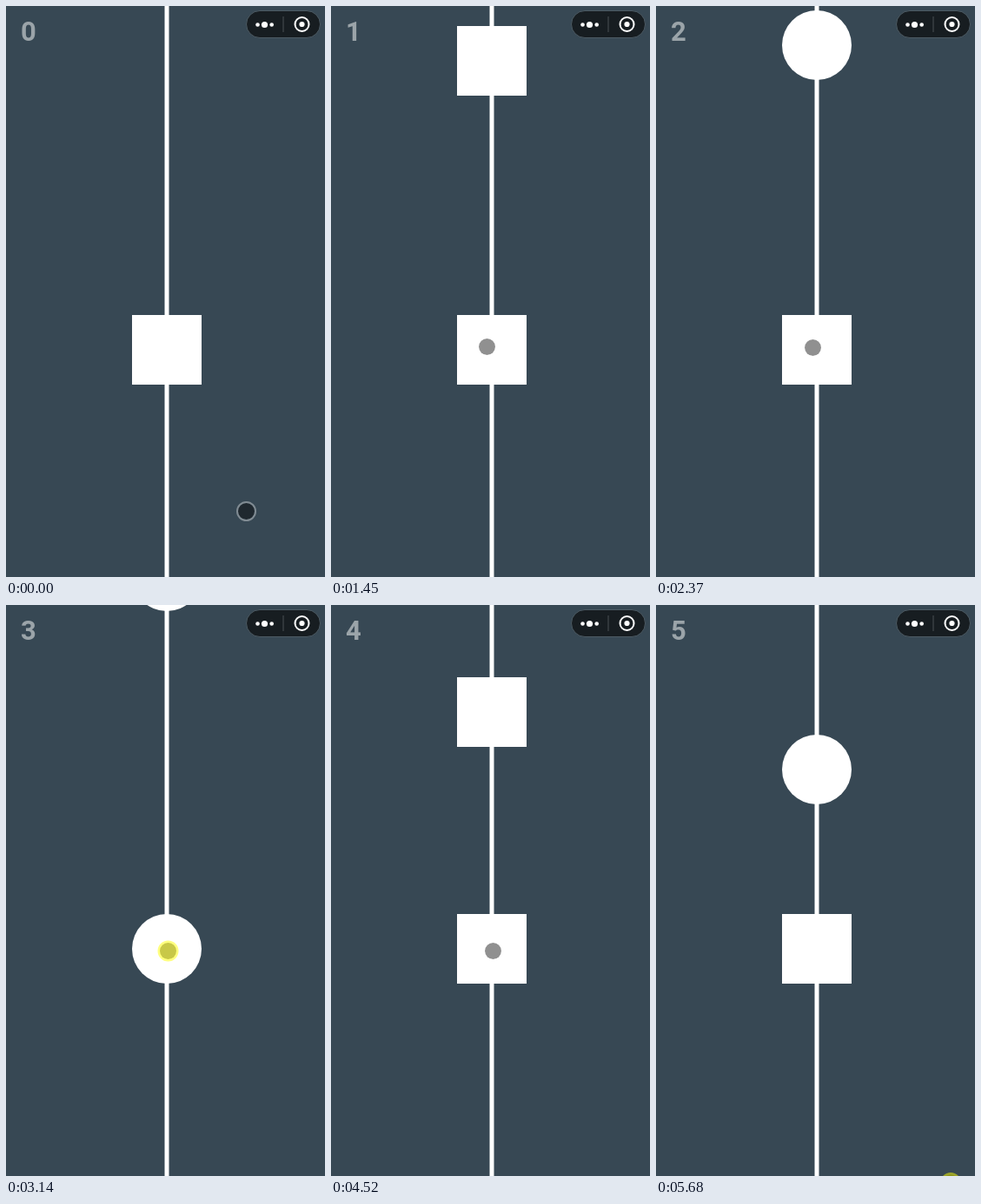
Write an HTML page that moves like this. It is 367 by 656 pixels and loops after 5750 ms.

```html
<!DOCTYPE html>
<html lang="en">
<head>
<meta charset="utf-8">
<title>Falling shapes</title>
<style>
  html, body { margin: 0; width: 100%; height: 100%; overflow: hidden; background: #374854; }
  svg { display: block; width: 367px; height: 656px; }
  text { font: bold 31px Roboto, sans-serif; fill: #9ba4a9; }
</style>
</head>
<body>
<svg viewBox="0 0 367 656">
  <rect width="367" height="656" fill="#374854"/>
  <rect x="182.5" width="5" height="656" fill="#fff"/>
  <rect id="faller" x="145" width="80" height="80" fill="#fff"/>
  <rect id="player" x="145" y="355" width="80" height="80" fill="#fff"/>
  <text id="score" x="17" y="40">0</text>
  <g>
    <rect x="276.5" y="5.5" width="85" height="31" rx="15.5" fill="#171d21" stroke="#4d5b64"/>
    <g fill="#fff">
      <circle cx="289.5" cy="21.5" r="2.3"/>
      <circle cx="297.5" cy="21.5" r="3.6"/>
      <circle cx="305.7" cy="21.5" r="2.3"/>
      <circle cx="340.5" cy="21" r="3.1"/>
    </g>
    <rect x="318.5" y="12" width="1" height="18" fill="#4a5155"/>
    <circle cx="340.5" cy="21" r="8" fill="none" stroke="#fff" stroke-width="2"/>
  </g>
  <g id="cursor">
    <circle r="9.5" fill="#000" fill-opacity=".435"/>
    <circle id="rim" r="10.5" fill="none" stroke="#fff" stroke-opacity=".37" stroke-width="2"/>
    <circle id="glow" r="12" fill="#ff0" fill-opacity=".5"/>
  </g>
</svg>
<script>
const LOOP = 5750, STEP = 76.9, LEAD = 22, LAST = 74;
const CYCLE = 348, SPAWN = -33, TICK = 6;

// [step, total distance fallen]: almost constant speed
const fall = [[0, -461], [31, 393], [51, 937], [66, 1365], [74, 1581]];

// Pointer moves in steps: from, span, destination
const home = [276.5, 580.5];
const moves = [
  { from: 1, span: 7, to: [179.5, 391.5] },
  { from: 20, span: 2, to: [180.5, 392.5] },
  { from: 33, span: 2, to: [186.5, 397.5] },
  { from: 59, span: 7, to: [280.5, 576.5] },
  { from: 67, span: 6, to: [339, 664] },
];
const holds = [[9, 16], [35, 58]];
const EXIT_PRESS = 73;

const $ = id => document.getElementById(id);
const faller = $("faller"), player = $("player"), score = $("score");
const cursor = $("cursor"), rim = $("rim"), glow = $("glow");

const mix = (a, b, p) => a + (b - a) * p;
const show = (el, on) => el.setAttribute("visibility", on ? "visible" : "hidden");
const setRound = (el, on) => el.setAttribute("rx", on ? 40 : 0);

function distance(s) {
  const i = Math.max(1, fall.findIndex(([step]) => step >= s));
  const [s0, d0] = fall[i - 1], [s1, d1] = fall[i];
  const d = mix(d0, d1, (s - s0) / (s1 - s0));
  return Math.round((d - 3) / TICK) * TICK + 3;
}

function pointer(s) {
  return moves.reduce((at, { from, span, to }) => {
    const p = Math.min(1, Math.max(0, (s - from) / span));
    return at.map((v, k) => mix(v, to[k], p * p));
  }, home);
}

function draw(time) {
  const s = Math.min(LAST, Math.floor((time % LOOP + LEAD) / STEP));

  const dist = distance(s);
  const n = Math.floor((dist - SPAWN) / CYCLE);
  const count = n + 1;
  show(faller, count >= 0);
  faller.setAttribute("y", dist - n * CYCLE - 40);
  setRound(faller, count % 3 !== 1);
  score.textContent = Math.max(0, count);

  // Holding the pointer down turns the player into a circle.
  const held = holds.some(([from, to]) => s >= from && s < to);
  const pressed = held || s >= EXIT_PRESS;
  setRound(player, held);
  show(glow, pressed);
  show(rim, !pressed);
  cursor.setAttribute("transform", `translate(${pointer(s)})`);
}

const start = performance.now();
function loop() {
  draw(performance.now() - start);
  requestAnimationFrame(loop);
}
loop();
</script>
</body>
</html>
```
